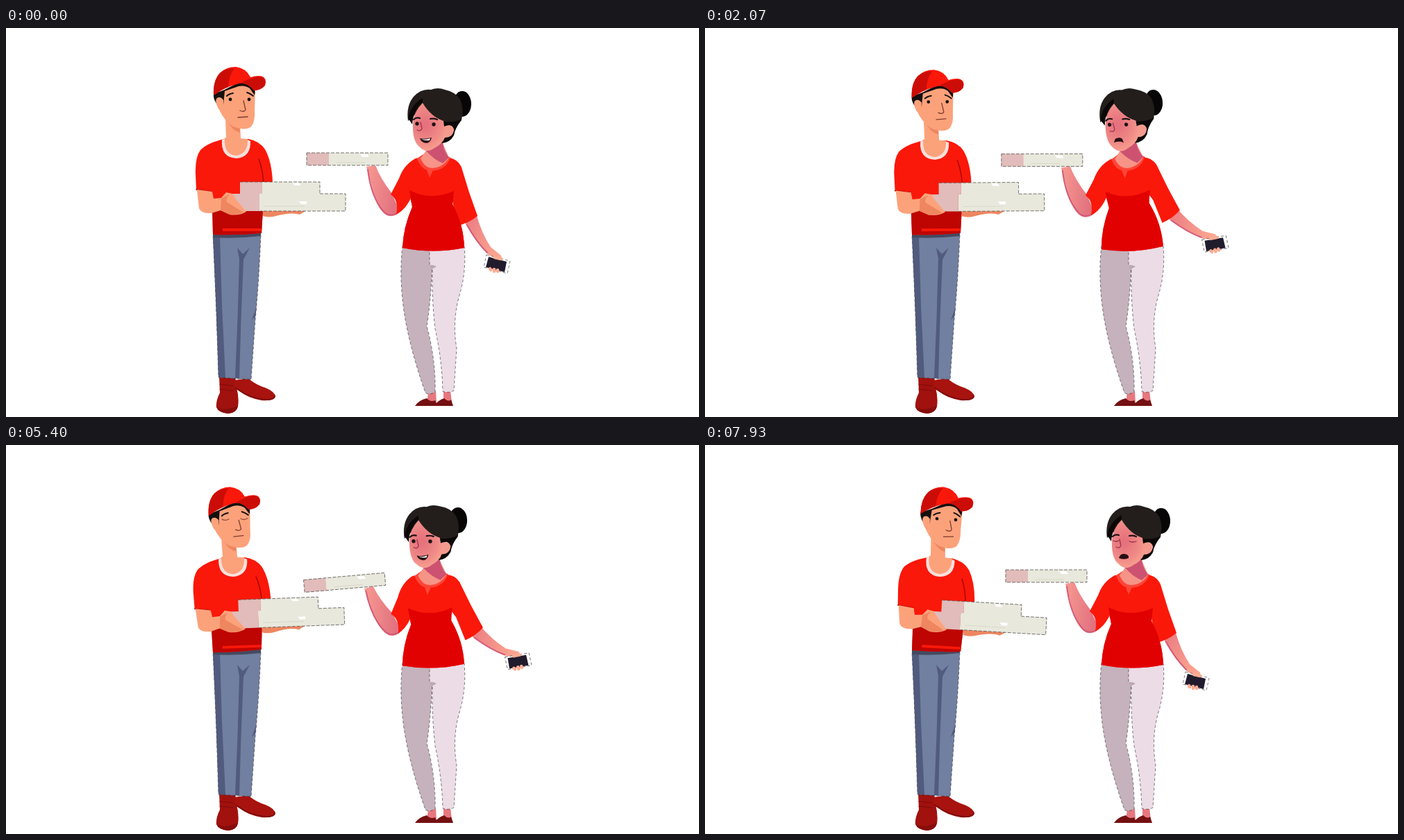
Recreate the animation shown at these times as an HTML page. Size 998 by 561 pixels, loop 8 s.

```html
<!DOCTYPE html>
<html lang="en">
<head>
<meta charset="utf-8">
<title>Delivery</title>
<style>
html, body { margin: 0; width: 100%; height: 100%; overflow: hidden; background: #fff; }
svg { display: block; width: 100%; height: 100%; }
.skin { fill: #fca27b; }
.shade { fill: #ee8660; }
.red { fill: #fa180a; }
.deep { fill: #be0502; }
.cream { fill: #e8e8dc; }
.pink { fill: #e1bcba; }
.edge { fill: none; stroke: #55524f; stroke-width: .8; stroke-dasharray: 5 2; }
.line { fill: none; stroke-linecap: round; stroke-linejoin: round; }
.rim { stroke: #2c292e; stroke-width: .6; stroke-dasharray: 4 3; }
</style>
</head>
<body>
<svg viewBox="0 0 998 561">
<defs>
  <radialGradient id="face" cx=".3" cy=".45" r=".65">
    <stop offset=".1" stop-color="#e5727c"/><stop offset=".6" stop-color="#f08b87"/><stop offset="1" stop-color="#fdaa93"/>
  </radialGradient>
  <linearGradient id="armLeft" x1="0" y1="0" x2="1" y2=".25">
    <stop offset="0" stop-color="#f79a91"/><stop offset="1" stop-color="#e2717f"/>
  </linearGradient>
  <linearGradient id="armRight" x1="0" y1="0" x2="1" y2="1">
    <stop offset="0" stop-color="#ea7b82"/><stop offset="1" stop-color="#ffac92"/>
  </linearGradient>
</defs>

<!-- man: legs -->
<path d="M307 502H330L332 518Q336 534 334 546Q332 555 320 556Q306 555 303 547Q302 538 308 526Z" fill="#a1110e"/>
<path d="M303 546Q312 554 334 545Q332 555 320 556Q306 555 303 546Z" fill="#860d0c"/>
<path class="line" d="M308 514L327 516M308 521L327 523" stroke="#7c0c0c" stroke-width="1.2"/>
<path d="M329 508L349 505Q358 514 374 519Q388 525 388 532Q384 538 368 537Q347 533 337 524L330 520Z" fill="#a8130f"/>
<path class="line" d="M331 519Q352 535 376 536Q386 536 387 531" stroke="#800c0c" stroke-width="2"/>
<path class="rim" d="M298 298H367Q364 370 359 420L353 507L306 504Q303 400 298 298Z" fill="#717fa0"/>
<path d="M298 300H308L311 400L316 504H306Q303 400 298 300Z" fill="#515b7d"/>
<path d="M333 317L341 326L351 317L342 334Q338 420 336 505H330Q334 420 336 333Z" fill="#515b7d"/>
<path d="M361 402L354 421L359 416Z" fill="#515b7d"/>
<path d="M298 295H367V300Q332 304 298 302Z" fill="#434a60"/>

<!-- man: upper body -->
<g id="man">
  <path class="red" d="M315 160Q291 165 280 176Q272 187 273 211L274 234L297 237L298 298Q335 299 368 296L370 262L384 223Q383 193 373 175Q365 163 349 160Z"/>
  <path class="deep" d="M297 262L370 262L368 296Q335 299 298 298Z"/>
  <path class="red" d="M312 289H368V293H312Z"/>
  <path class="line" d="M364 189Q370 205 371 225M274 233L296 236" stroke="#a9070a" stroke-width="1.5"/>
  <path d="M311 161Q309 187 332 188Q353 186 352 163L345 160H316Z" fill="#fae0dc"/>
  <path class="skin" d="M315 158Q313 183 332 184Q349 181 348 160Z"/>
  <path class="skin" d="M316 130L317 158Q319 172 330 177Q340 170 338 158L337 140Z"/>
  <path class="shade" d="M337 143Q328 144 320 136Q326 148 337 151Z"/>
  <path class="skin" d="M306 94Q300 99 304 110Q308 122 315 131Q323 143 337 145Q349 147 354 141Q359 133 358 120L359 84Q335 75 306 94Z"/>
  <path d="M299 95L315 89L336 78L355 79Q360 88 358 97L351 87Q344 82 335 84L315 91L313 111Q309 99 304 101L303 109Q298 101 299 95Z" fill="#15100f"/>
  <path class="skin" d="M304 101Q300 104 305 115Q309 121 313 118V104Q309 98 304 101Z"/>
  <path class="red" d="M299 97Q298 76 308 65Q317 56 331 56Q346 58 352 71Q374 65 374 78Q371 90 357 90Q347 78 336 80Q315 85 299 97Z"/>
  <path d="M299 97Q298 76 308 65Q316 58 329 58Q321 68 320 85Q308 90 299 97ZM337 80Q352 71 365 70Q376 72 373 83Q367 90 357 90Q348 78 337 80Z" fill="#cc0d07"/>
  <path class="line" d="M318 98Q321 95 327 94M347 93Q351 94 356 98" stroke="#17100f" stroke-width="2"/>
  <g id="manOpen" fill="#17100f"><circle cx="323" cy="103" r="2.4"/><circle cx="350" cy="103" r="2.4"/></g>
  <path id="manShut" class="line" d="M318 103Q323 106 328 103M345 103Q350 106 355 103" stroke="#8b4938" stroke-width="1.3"/>
  <path class="line" d="M342 105L345 118Q343 122 337 119M334 129L348 128" stroke="#7b3b2d" stroke-width="1.3"/>

  <path class="shade" d="M370 262V271Q378 274 389 271Q411 265 423 269L433 263Z"/>
  <path class="pink" d="M337 222H369V239H365V264H338L320 239H337Z"/>
  <path class="cream" d="M369 222H452V239H489V264H365V239H369Z"/>
  <path class="edge" d="M337 222H452V239M452 239H489V264H366"/>
  <path d="M413 223L421 223L425 227L415 227ZM422 250H433V254H425Z" fill="#fff"/>
  <path class="line" d="M372 257H430" stroke="#d8d9cb" stroke-width="1"/>
  <path class="skin" d="M275 233L297 236L299 246L310 245L317 237L326 239L332 248L346 265Q336 271 322 269L309 263L296 267Q281 268 278 260Z"/>
  <path class="shade" d="M310 246L322 240Q316 246 318 251L342 266Q332 270 322 269L309 263Z"/>
</g>

<!-- woman: legs -->
<path d="M608 526L619 524L620 541H606ZM630 524L640 522L642 541H630Z" fill="#e7777f"/>
<path d="M589 545Q594 537 606 534Q611 540 618 537L621 545ZM616 545Q622 537 631 534Q637 540 641 536L644 545Z" fill="#741011"/>
<path class="rim" d="M571 314Q566 358 573 408Q581 461 604 526Q609 530 618 525Q619 478 606 430Q611 400 614 344L612 315Z" fill="#c5b2bc"/>
<path class="rim" d="M610 315H660Q663 350 654 382Q642 421 649 462L645 523Q637 527 629 524Q628 480 618 434Q613 390 614 345L610 343Z" fill="#ebdce6"/>
<path d="M610 342Q615 341 620 344L613 348Z" fill="#bda7b4"/>

<!-- woman: upper body -->
<g id="woman">
  <g id="serve">
    <path d="M519 200L532 198Q539 217 556 239L567 265Q559 274 548 270Q532 260 525 222Z" fill="url(#armLeft)"/>
    <path class="line" d="M521 204Q526 246 545 266Q554 273 563 267" stroke="#d45a78" stroke-width="2"/>
    <path class="red" d="M590 188Q573 197 566 217L554 240Q566 248 562 269Q577 261 585 241L606 210Z"/>
    <path class="pink" d="M433 180H465V198H433Z"/>
    <path class="cream" d="M465 180H550V198H465Z"/>
    <path class="edge" d="M433 180H550V198H433Z"/>
    <path d="M510 182H520L523 186H513Z" fill="#fff"/>
    <path class="line" d="M476 194H517" stroke="#d6d7c8" stroke-width="1"/>
  </g>
  <g id="upper">
    <g id="fore">
      <path d="M662 276L678 271Q685 296 698 316L713 328Q716 337 707 337L694 326Q677 309 662 283Z" fill="url(#armRight)"/>
      <path class="line" d="M664 284Q677 308 693 324" stroke="#d45a78" stroke-width="2"/>
      <path class="rim" d="M692 327L726 336L722 354L688 345Z" fill="#fff"/>
      <path d="M695 330L721 337L718 352L691 345Z" fill="#211c2d"/>
      <path class="line" d="M697 347L698 349M703 348V351M708 349V351M704 331L713 333" stroke="#ffac92" stroke-width="4.5"/>
    </g>
    <path class="red" d="M636 187Q650 188 656 201L667 237L679 271Q667 281 651 285L643 250L622 212Z"/>
  </g>
  <path class="red" d="M590 188Q612 184 640 187L651 205L643 240L643 254Q659 283 660 317Q615 326 571 317Q572 288 585 258L580 235L578 215Z"/>
  <path d="M581 234Q612 250 645 235L643 254Q659 283 660 317Q615 326 571 317Q572 288 585 258Z" fill="#e20101"/>
  <path d="M592 188Q598 206 613 206Q634 205 640 187L632 182H601Z" fill="#ff4638"/>
  <path d="M606 205L610 216L615 205Z" fill="#ff4638"/>
  <path d="M597 188Q603 202 614 202Q630 201 638 187L628 164L607 174Z" fill="#f59487"/>
  <path d="M604 176Q620 172 629 160Q628 174 638 187L629 195Q616 190 604 176Z" fill="#cd5271"/>
  <ellipse cx="657" cy="109.500" rx="13" ry="18.500" fill="#080606"/>
  <path d="M579 134Q576 112 587 99Q598 87 612 89Q622 85 632 89Q647 92 654 103Q660 115 656 133Q646 145 645 155Q639 166 627 166L608 140L590 124Z" fill="#231e1c"/>
  <path d="M630 135Q646 137 656 131Q647 144 645 154Q638 166 627 166Z" fill="#0b0807"/>
  <path d="M600 108Q587 121 586 137Q585 163 595 171Q605 182 617 173Q629 167 632 158Q644 158 645 146Q642 137 631 142L630 134Q612 128 600 108Z" fill="url(#face)"/>
  <path d="M600 107Q587 117 585 139L579 130Q583 111 600 101Z" fill="#0b0807"/>
  <path d="M633 156Q643 158 645 147Q642 140 634 143Z" fill="#f59a8e"/>
  <path class="line" d="M587 132Q591 128 596 130M611 131Q616 130 621 132" stroke="#1d1215" stroke-width="2.2"/>
  <g id="womanOpen" fill="#1d1215"><circle cx="592" cy="138" r="2.7"/><circle cx="616" cy="139" r="2.7"/></g>
  <path id="womanShut" class="line" d="M588 138Q592 140 596 138M611 139Q616 141 621 139" stroke="#8d2b43" stroke-width="1.3"/>
  <path class="line" d="M597 136L599 145Q597 150 592 147" stroke="#a43650" stroke-width="1.4"/>
  <g fill="#250f13" id="mouths">
    <g><path d="M596 159Q604 161 613 158Q611 166 605 166Q598 165 596 159Z"/><path d="M598 160Q605 162 611 159L610 162Q603 163 598 160Z" fill="#fff"/></g>
    <path d="M597 164L599 159Q604 156 609 159L611 165L607 163H601Z"/>
    <path d="M596 163Q598 156 604 157Q611 158 610 163Q603 166 596 163Z"/>
  </g>
</g>
</svg>
<script>
const LOOP = 8000, STEP = 1000 / 15;

// One digit per 400 ms: smile, frown, oval.
const SPEECH = '02010102021020210102';
const SYLLABLE = LOOP / SPEECH.length;

const el = id => document.getElementById(id);
const mouths = [...el('mouths').children];

// Smooth step from 0 to 1 that begins at `start`.
function glide(t, start, length) {
  const u = Math.min(1, Math.max(0, (t - start) / length));
  return u * u * (3 - 2 * u);
}
const hold = (t, enter, leave, length) => glide(t, enter, length) - glide(t, leave, length);
const pulse = (t, peak, reach) => glide(t, peak - reach, reach) - glide(t, peak, reach);

// The man rocks slowly to the right and faster back to the left.
function rock(t) {
  const right = start => glide(t, start, 1400), left = start => glide(t, start, 700);
  return 10 * (right(-700) - left(1700) + right(2400) - left(4950) + right(6900)) - 5;
}
const lean = t => -5.6 * hold(t, 1700, 2800, 700) - 4.6 * hold(t, 5000, 6800, 1000);
const reach = t => hold(t, 400, 2550, 800) + hold(t, 4400, 6550, 800);
const tilt = t => pulse(t, 2800, 700) - 3 * pulse(t, 1330, 800) - 5 * pulse(t, 5400, 900) + 2.5 * pulse(t, 6930, 800);

const turn = (id, angle, x, y, extra = '') =>
  el(id).setAttribute('transform', `rotate(${angle.toFixed(3)} ${x} ${y})${extra}`);
const show = (node, on) => node.setAttribute('visibility', on ? 'visible' : 'hidden');
function blink(who, t, ...times) {
  const shut = times.some(at => Math.abs(t - at) < 100);
  show(el(who + 'Open'), !shut);
  show(el(who + 'Shut'), shut);
}

function draw(t) {
  const squash = 1 - .018 * (pulse(t, 2050, 350) + pulse(t, 5400, 350) + pulse(t, 7930, 350));
  turn('man', rock(t), 333, 298, ` translate(0 ${298 * (1 - squash)}) scale(1 ${squash})`);

  const body = lean(t), out = reach(t), shoulder = -9 * Math.sqrt(Math.max(0, out));
  turn('woman', body, 615, 318);
  turn('serve', tilt(t) - body, 590, 200);
  turn('upper', shoulder - body, 640, 195);
  turn('fore', -24.5 * out - shoulder, 664, 280);

  blink('man', t, 4000, 5400);
  blink('woman', t, 7930);
  const shape = +SPEECH[Math.floor(t / SYLLABLE)];
  mouths.forEach((mouth, i) => show(mouth, i === shape));
}

const start = performance.now();
function tick() {
  const t = (performance.now() - start) % LOOP;
  draw(Math.min(Math.floor((t + 4) / STEP) * STEP, LOOP - 1));
  requestAnimationFrame(tick);
}
draw(0);
requestAnimationFrame(tick);
</script>
</body>
</html>
```
